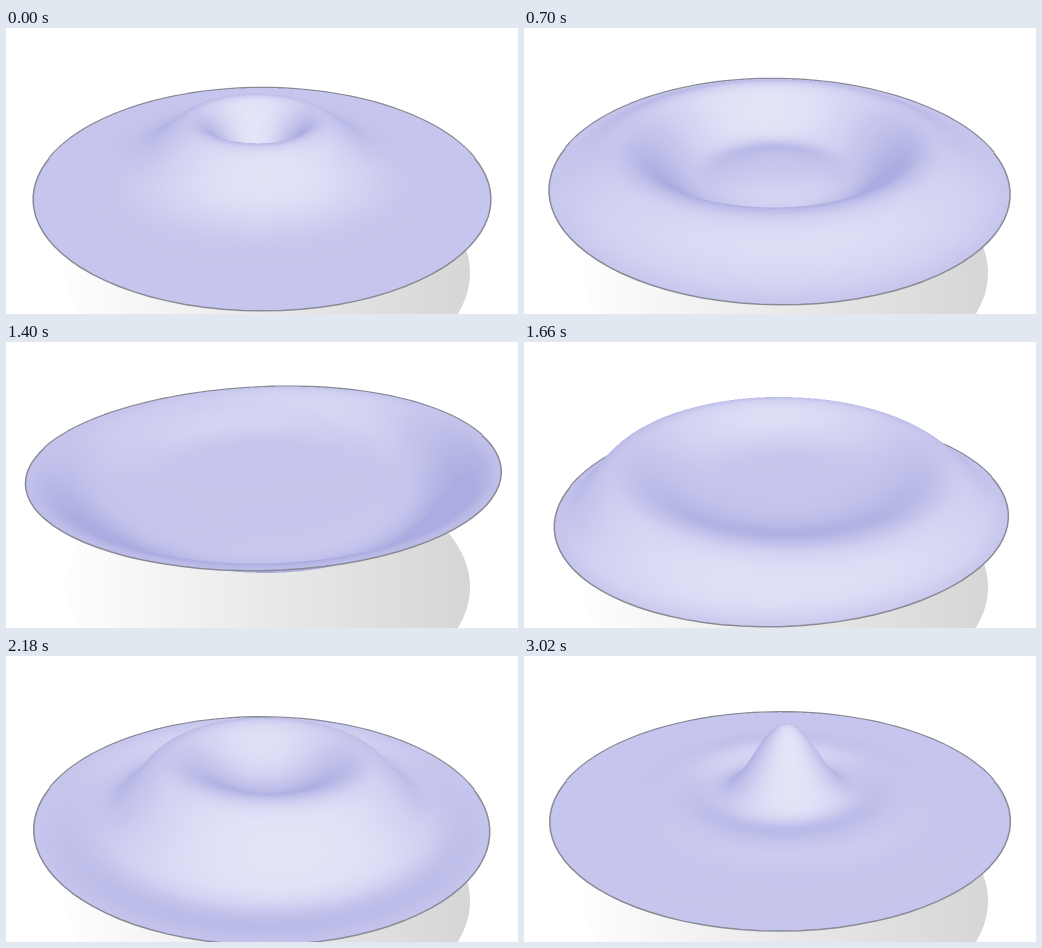
Write an HTML page with a canvas that moves like this. It is 512x286 px and loops after 3.04 s.

```html
<!DOCTYPE html>
<html lang="en">
<head>
<meta charset="utf-8">
<title>Waves on a round membrane</title>
<style>
  html, body { margin: 0; width: 100%; height: 100%; overflow: hidden; background: #fff; }
  canvas { display: block; width: 512px; height: 286px; }
</style>
</head>
<body>
<canvas id="stage" width="512" height="286"></canvas>
<script>
const LOOP = 3040, STEP = 20;
const W = 512, H = 286, SS = 2;

// Wave: a Gaussian bump released near the centre of a disc with a free rim.
// Short waves lag slightly behind long ones.
const AMP = 0.77, SIGMA = 0.155, SPEED = 0.583, LEAD = 0.412, LAG = 0.0002;
const SRC_X = -0.025, SRC_Y = 0.04;
const SRC_R = Math.hypot(SRC_X, SRC_Y), SRC_A = Math.atan2(SRC_Y, SRC_X);

// Zeros of the derivative of each Bessel function J0, J1, J2
const ROOTS = [
  [0, 3.8317, 7.0156, 10.1735, 13.3237, 16.4706, 19.6159, 22.7601, 25.9037],
  [1.8412, 5.3314, 8.5363, 11.706, 14.8636, 18.0155, 21.1644, 24.3113],
  [3.0542, 6.7061, 9.9695, 13.1704, 16.3475, 19.5129, 22.6716]
];

// Mesh
const RINGS = 44, SPOKES = 108, R_MIN = 0.0005;
const DR = (1 - R_MIN) / (RINGS - 1);

// Camera
const DIST = 2.4, SIN = 0.452, COS = 0.892, ZOOM = 212.5 * DIST;
const CX = 256, CY = 130;

// Light comes from the viewer's side
const LIGHT = [0.09, -0.79, 0.605];

const ctx = document.getElementById('stage').getContext('2d');
const layer = document.createElement('canvas');
layer.width = W * SS;
layer.height = H * SS;
const layerCtx = layer.getContext('2d');
const image = layerCtx.createImageData(layer.width, layer.height);
const pixels = new Uint32Array(image.data.buffer);

function bessel(m, x) {
  const n = 48;
  let sum = 0;
  for (let i = 0; i < n; i++) {
    const a = (i + 0.5) * Math.PI / n;
    sum += Math.cos(m * a - x * Math.sin(a));
  }
  return sum / n;
}

const radius = i => R_MIN + i * DR;

const modes = ROOTS.flatMap((list, m) => list.map(k => {
  const norm = k ? (1 - m * m / (k * k)) * bessel(m, k) ** 2 : 1;
  const gain = AMP * 2 * SIGMA ** 2 * Math.exp(-((k * SIGMA) ** 2) / 2)
    * bessel(m, k * SRC_R) * (m ? 2 : 1) / norm;
  const shape = Float64Array.from({ length: RINGS }, (_, i) => gain * bessel(m, k * radius(i)));
  return { m, omega: k * (1 - LAG * k * k), shape };
}));

const spokes = Array.from({ length: SPOKES }, (_, j) => {
  const a = j * 2 * Math.PI / SPOKES, b = a - SRC_A;
  return {
    c: Math.cos(a), s: Math.sin(a),
    cos: [1, Math.cos(b), Math.cos(2 * b)],
    sin: [0, Math.sin(b), 2 * Math.sin(2 * b)]
  };
});

// Quads ordered from far to near
const quads = [];
for (let i = 0; i < RINGS - 1; i++) {
  for (let j = 0; j < SPOKES; j++) {
    const next = (j + 1) % SPOKES;
    const y = radius(i + 0.5) * Math.sin((j + 0.5) * 2 * Math.PI / SPOKES);
    const at = i * SPOKES;
    quads.push({ y, v: [at + j, at + next, at + SPOKES + next, at + SPOKES + j] });
  }
}
quads.sort((a, b) => b.y - a.y);

const clamp = (v, lo, hi) => Math.max(lo, Math.min(hi, v));

const palette = Uint32Array.from({ length: 256 }, (_, i) => {
  const d = i / 255 - LIGHT[2];
  const rg = Math.round(clamp(197 + d * (d < 0 ? 55 : 80), 172, 240));
  const blue = Math.round(clamp(237 + d * 28, 226, 252));
  return (255 << 24 | blue << 16 | rg << 8 | rg) >>> 0;
});

const count = RINGS * SPOKES;
const px = new Float64Array(count), py = new Float64Array(count), lum = new Float64Array(count);

function shapeMesh(tau) {
  const radial = ROOTS.map(() => new Float64Array(RINGS));
  for (const { m, omega, shape } of modes) {
    const swing = Math.cos(omega * tau);
    for (let i = 0; i < RINGS; i++) radial[m][i] += shape[i] * swing;
  }
  for (let i = 0; i < RINGS; i++) {
    const r = radius(i), lo = Math.max(i - 1, 0), hi = Math.min(i + 1, RINGS - 1);
    for (let j = 0; j < SPOKES; j++) {
      const p = spokes[j];
      let z = 0, zr = 0, za = 0;
      radial.forEach((f, m) => {
        z += f[i] * p.cos[m];
        zr += (f[hi] - f[lo]) / ((hi - lo) * DR) * p.cos[m];
        za -= f[i] * p.sin[m] / r;
      });
      const gx = zr * p.c - za * p.s, gy = zr * p.s + za * p.c;
      const x = r * p.c, y = r * p.s, v = i * SPOKES + j;
      const scale = ZOOM / (DIST + y * COS - z * SIN);
      px[v] = CX + x * scale;
      py[v] = CY - (y * SIN + z * COS) * scale;
      const dot = (LIGHT[2] - gx * LIGHT[0] - gy * LIGHT[1]) / Math.sqrt(1 + gx * gx + gy * gy);
      lum[v] = 255 * clamp(dot, 0, 1);
    }
  }
}

function triangle(a, b, c) {
  const ax = px[a] * SS, ay = py[a] * SS;
  const bx = px[b] * SS - ax, by = py[b] * SS - ay;
  const cx = px[c] * SS - ax, cy = py[c] * SS - ay;
  const area = bx * cy - by * cx;
  if (Math.abs(area) < 1e-6) return;
  const x0 = Math.max(0, Math.floor(ax + Math.min(0, bx, cx)));
  const x1 = Math.min(layer.width - 1, Math.ceil(ax + Math.max(0, bx, cx)));
  const y0 = Math.max(0, Math.floor(ay + Math.min(0, by, cy)));
  const y1 = Math.min(layer.height - 1, Math.ceil(ay + Math.max(0, by, cy)));
  const base = lum[a], db = lum[b] - base, dc = lum[c] - base;
  for (let y = y0; y <= y1; y++) {
    const dy = y + 0.5 - ay;
    for (let x = x0; x <= x1; x++) {
      const dx = x + 0.5 - ax;
      const u = (dx * cy - dy * cx) / area;
      const v = (bx * dy - by * dx) / area;
      if (u >= -1e-6 && v >= -1e-6 && u + v <= 1.000001) {
        pixels[y * layer.width + x] = palette[Math.round(base + u * db + v * dc)];
      }
    }
  }
}

function drawSurface() {
  pixels.fill(0);
  for (const { v } of quads) {
    triangle(v[0], v[1], v[2]);
    triangle(v[0], v[2], v[3]);
  }
  layerCtx.putImageData(image, 0, 0);
  ctx.drawImage(layer, 0, 0, W, H);
}

function drawRim(from, to, width) {
  ctx.beginPath();
  for (let j = from; j <= to; j++) {
    const v = (RINGS - 1) * SPOKES + j % SPOKES;
    ctx.lineTo(px[v], py[v]);
  }
  ctx.lineWidth = width;
  ctx.strokeStyle = '#8a8a96';
  ctx.stroke();
}

function drawShadow() {
  const fade = ctx.createLinearGradient(58, 0, 464, 0);
  fade.addColorStop(0, '#fefefe');
  fade.addColorStop(0.5, '#e9e9e9');
  fade.addColorStop(1, '#d6d6d6');
  ctx.fillStyle = fade;
  ctx.beginPath();
  ctx.ellipse(262, 245, 202, 120, 0, 0, 2 * Math.PI);
  ctx.fill();
}

function draw(ms) {
  ctx.fillStyle = '#fff';
  ctx.fillRect(0, 0, W, H);
  drawShadow();
  shapeMesh(SPEED * (ms / 1000 + LEAD));
  drawRim(0, SPOKES / 2, 2.4);
  drawSurface();
  drawRim(SPOKES / 2, SPOKES, 1.5);
}

ctx.imageSmoothingQuality = 'high';
ctx.lineJoin = 'round';
let shown = -1;
const start = performance.now();

function tick() {
  const t = Math.max(0, performance.now() - start) % LOOP;
  const ms = Math.floor(t / STEP) * STEP;
  if (ms !== shown) draw(shown = ms);
  requestAnimationFrame(tick);
}
tick();
</script>
</body>
</html>
```
